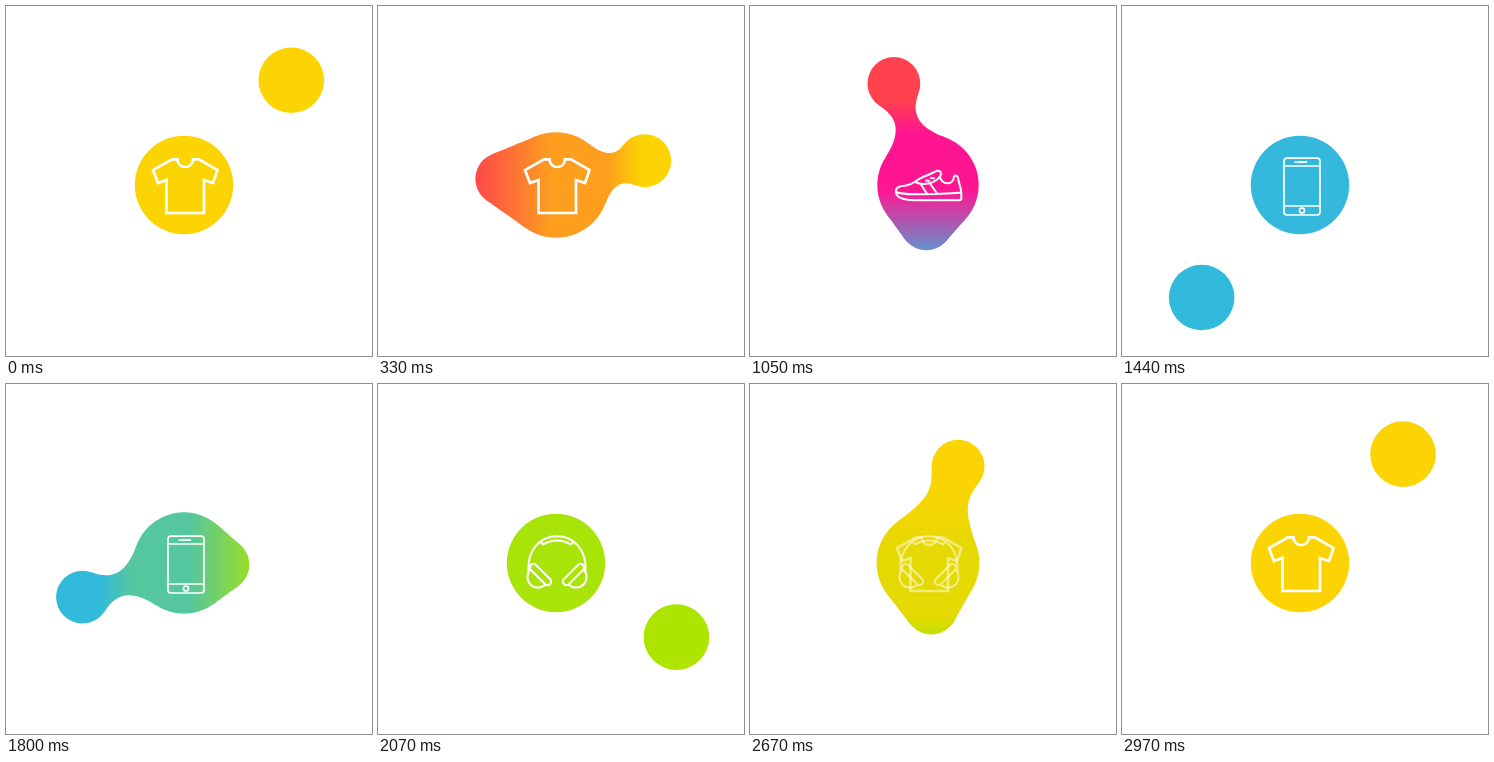
Write an HTML page with a canvas that moves like this. It is 366 by 350 pixels and loops after 3000 ms.

```html
<!DOCTYPE html>
<html lang="en">
<head>
<meta charset="utf-8">
<title>Gooey category loop</title>
<style>
  html, body { margin: 0; width: 100%; height: 100%; overflow: hidden; background: #fff; }
  canvas { display: block; }
</style>
</head>
<body>
<canvas id="stage" width="366" height="350"></canvas>
<script>
const ctx = document.getElementById('stage').getContext('2d');
const LOOP = 3000, STEP = 750, HALF = STEP / 2, LEAD = 8;
const CX = 178, CY = 179, BODY = 49.2;
const RAD = Math.PI / 180;

const YELLOW = [252, 212, 3], RED = [255, 66, 77], PINK = [255, 20, 147];
const BLUE = [50, 186, 221], GREEN = [174, 229, 0];
const colors = [YELLOW, RED, BLUE, GREEN];

const cup = new Path2D('M152.5 185.5A3.6 3.6 0 0 1 157.5 180.5L172.5 195.5' +
  'A3.6 3.6 0 0 1 167.5 200.5ZA10.6 10.6 0 0 0 167.5 200.5');
const headphones = new Path2D('M150.4 187C149.4 166 162 152.2 179 152.2S208.6 166 207.6 187' +
  'M162.5 157.5L165 160.5Q179 152.5 193 160.5L195.5 157.5');
headphones.addPath(cup);
headphones.addPath(cup, new DOMMatrix([-1, 0, 0, 1, 358, 0]));

const icons = [
  { width: 2.7, path: new Path2D('M166 153.4H171.5C172 163.5 186.5 163.5 187 153.4H193L211.5 164' +
    'L207 177L198 174V207H160.5V174L152 177L147 164Z') },
  { width: 2, path: new Path2D('M146 186C145 181 150 180 156 179.5C163 178.5 166 174 173 171' +
    'C180 168.5 184 166 187 164.8C190 164 192 167 190.5 169.5C188 174 183 176.5 178 177.5' +
    'C173 178.5 168 177.5 165 176M190 171C192 179 203 180 204 170.5Q206 168 208 171.5' +
    'C208.5 177 211 181 211.3 187V193Q211 194.3 209 194.3H165C155 194 146 192.5 146 186' +
    'C152 188.5 160 188.3 168 188.2C185 188 200 188 211.3 186.5' +
    'M171 178.5L177 187.7M180 177.5L187 187.5M176 174.5L179 174.8M181 172L184 172.3') },
  { width: 1.7, path: new Path2D('M165 152.2H195A3 3 0 0 1 198 155.2V206A3 3 0 0 1 195 209H165' +
    'A3 3 0 0 1 162 206V155.2A3 3 0 0 1 165 152.2M162 160H198M162 200H198' +
    'M175.5 156.2H184.5M173.2 156.2H173.7M182.5 204.5A2.5 2.5 0 1 1 177.5 204.5A2.5 2.5 0 1 1 182.5 204.5') },
  { width: 2, path: headphones }
];

const clamp = x => Math.min(1, Math.max(0, x));
const smooth = x => (x = clamp(x)) * x * (3 - 2 * x);
const mix = (a, b, p) => a.map((c, i) => c + (b[i] - c) * p);
const css = c => `rgb(${c.map(Math.round)})`;

function blend(a, b, p) {
  if (a !== RED) return mix(a, b, p);
  return p < .28 ? mix(a, PINK, p / .28) : mix(PINK, b, (p - .28) / .72);
}

// Position on petal n, v ms away from its tip
function ballAt(n, v) {
  const w = Math.abs(v);
  const dist = w < 315 ? 150 - 2.24e-4 * w ** 2 - 2.36e-9 * w ** 4 : 104.5 - .52 * (w - 315);
  const angle = (-45 - 90 * n + .075 * v + 1.1e-7 * v ** 3) * RAD;
  return { dist, angle, r: 32.8 - 6.4 * smooth((w - 180) / 130) };
}

function disc(x, y, r) {
  ctx.beginPath();
  ctx.arc(x, y, r, 0, 7);
  ctx.fill();
}

// Curved bridge between the body and a ball at distance d
function bridge(R, r, d, angle, spread) {
  if (d <= R - r) return;
  const touch = d < R + r;
  const u1 = touch ? Math.acos((R * R + d * d - r * r) / (2 * R * d)) : 0;
  const u2 = touch ? Math.acos((r * r + d * d - R * R) / (2 * r * d)) : 0;
  const tangent = Math.acos((R - r) / d);
  const a = u1 + (tangent - u1) * spread;
  const b = Math.PI - u2 - (Math.PI - u2 - tangent) * spread;
  const x1 = R * Math.cos(a), y1 = R * Math.sin(a);
  const x2 = d + r * Math.cos(b), y2 = r * Math.sin(b);
  const k = Math.min(spread * 2.4, Math.hypot(x2 - x1, y2 - y1) / (R + r)) * Math.min(1, 2 * d / (R + r));
  const hx1 = x1 + k * y1, hy1 = y1 - k * x1;
  const hx2 = x2 - k * y2, hy2 = y2 + k * (x2 - d);

  const flat = new Path2D(), placed = new Path2D();
  flat.moveTo(x1, y1);
  flat.bezierCurveTo(hx1, hy1, hx2, hy2, x2, y2);
  flat.lineTo(x2, -y2);
  flat.bezierCurveTo(hx2, -hy2, hx1, -hy1, x1, -y1);
  const c = Math.cos(angle), s = Math.sin(angle);
  placed.addPath(flat, new DOMMatrix([c, s, -s, c, CX, CY]));
  ctx.fill(placed);
}

function drawBall(n, v, R, paint) {
  const { dist, angle, r } = ballAt(n, v);
  if (dist <= 0) return;
  const leaving = v < 0;
  const joined = dist < (leaving ? 128 : 118);
  ctx.fillStyle = joined ? paint : css(colors[n % 4]);
  disc(CX + dist * Math.cos(angle), CY + dist * Math.sin(angle), r);
  if (!joined) return;
  const spread = Math.min(1, (leaving ? .7 : .5) + Math.max(0, 90 - dist) * .012);
  bridge(R, r, dist, angle, spread);
}

// Colour runs through the body from the arriving side to the leaving side
function makePaint(n, u, from, body, to) {
  const angle = -90 * n * RAD, x = 110 * Math.cos(angle), y = 110 * Math.sin(angle);
  const tint = smooth((250 - Math.abs(u)) / 120);
  const g = ctx.createLinearGradient(CX + x, CY + y, CX - x, CY - y);
  const stops = [[-85, mix(body, from, tint)], [-52, body], [5, body], [85, mix(body, to, tint)]];
  stops.forEach(([s, c]) => g.addColorStop((s + 110) / 220, css(c)));
  return g;
}

function drawIcon({ path, width }, alpha) {
  ctx.globalAlpha = alpha;
  ctx.lineWidth = width;
  ctx.stroke(path);
  ctx.globalAlpha = 1;
}

function draw(now) {
  const time = now % LOOP + LEAD;
  const n = Math.floor(time / STEP), u = time - n * STEP - HALF;
  const from = colors[n % 4], to = colors[(n + 1) % 4];
  const body = blend(from, to, 1 / (1 + Math.exp(-u / 68)));
  const R = BODY + 5 * Math.exp(-((u / 60) ** 2));
  const paint = makePaint(n, u, from, body, to);

  ctx.fillStyle = '#fff';
  ctx.fillRect(0, 0, 366, 350);
  ctx.fillStyle = paint;
  disc(CX, CY, R);
  drawBall(n, u + HALF, R, paint);
  drawBall(n + 1, u - HALF, R, paint);

  ctx.strokeStyle = '#fff';
  ctx.lineCap = 'round';
  const fade = clamp(u / 116);
  drawIcon(icons[n % 4], 1 - fade);
  drawIcon(icons[(n + 1) % 4], fade);
}

const start = performance.now();
function tick() {
  draw(performance.now() - start);
  requestAnimationFrame(tick);
}
tick();
</script>
</body>
</html>
```
